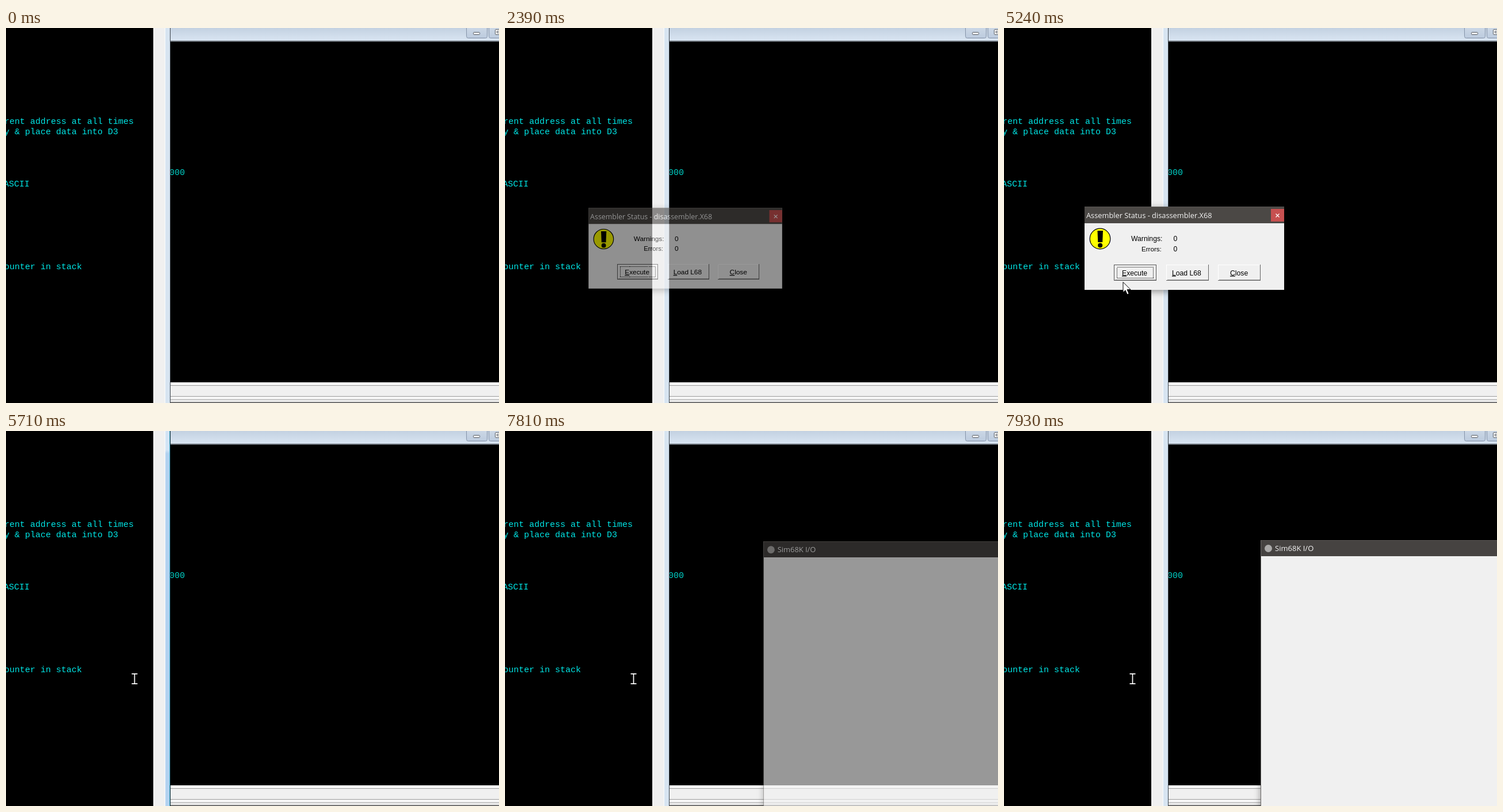
Recreate the animation shown at these times as an HTML page. Size 857x653 px, loop 7990 ms.

```html
<!DOCTYPE html>
<html lang="en">
<head>
<meta charset="utf-8">
<title>Assembler session</title>
<style>
  html, body { margin: 0; height: 100%; overflow: hidden; background: #000; }
  svg { display: block; width: 100vw; height: 100vh; }
  text { white-space: pre; }
  .code { font: 15px "Liberation Mono", "Courier New", monospace; fill: #00e6e6; }
  .title { font: 12.8px "Open Sans", "Noto Sans", sans-serif; fill: #f4f4f4; }
  .label { font: 12.2px "Liberation Sans", Arial, sans-serif; fill: #000; }
  .key { text-decoration: underline; }
  .shadow { filter: drop-shadow(0 3px 6px rgba(0, 0, 0, .4)); }
  .crisp { shape-rendering: crispEdges; }
</style>
</head>
<body>
<svg viewBox="0 0 857 653" preserveAspectRatio="none">
  <defs>
    <linearGradient id="bar" x2="0" y2="1">
      <stop stop-color="#c3d1e1"/><stop offset="1" stop-color="#d9e5f2"/>
    </linearGradient>
    <linearGradient id="glow" x2="0" y2="1">
      <stop stop-color="#d3e3f4"/><stop offset=".05" stop-color="#d3e5f6"/>
      <stop offset=".06" stop-color="#b3d2f0"/><stop offset="1" stop-color="#b3d2f0"/>
    </linearGradient>
    <linearGradient id="cap" x2="0" y2="1">
      <stop stop-color="#d0dbe8"/><stop offset="1" stop-color="#bccbde"/>
    </linearGradient>
    <clipPath id="pane"><path d="M286 24H857V617H286z"/></clipPath>
  </defs>

  <!-- left editor -->
  <g class="code">
    <text x="-3" y="167">rent address at all times</text>
    <text x="-3" y="185">y &amp; place data into D3</text>
    <text x="-4" y="276">ASCII</text>
    <text x="-3" y="420">ounter in stack</text>
  </g>

  <!-- right editor -->
  <g class="crisp">
    <path fill="#f0f0f0" d="M256 0h20v653h-20z"/>
    <path fill="#fafcfe" d="M276 0h1v653h-1z"/>
    <path fill="#d7e4f1" d="M277 0h8v653h-8z"/>
    <path fill="url(#bar)" d="M285 0h572v22H285z"/>
    <path fill="#6d747c" d="M285 22h572v2H285z"/>
    <path fill="#f0f0f0" d="M286 617h571v36H286z"/>
    <path fill="#fafafa" d="M286 617h571v5H286zM286 642h571v2H286zM286 648h571v2H286z"/>
    <path fill="#9a9a9a" d="M286 622h571v1H286zM286 641h571v1H286zM286 647h571v1H286z"/>
    <path fill="#747474" d="M286 651h571v2H286z"/>
    <path fill="#3c444c" d="M285 0h1v653h-1z"/>
    <g id="active">
      <path fill="url(#glow)" d="M277 0h8v653h-8z"/>
      <path fill="#5fc6e6" d="M284 0h1v653h-1z"/>
      <path fill="#10242c" d="M285 0h1v653h-1z"/>
    </g>
  </g>
  <g fill="url(#cap)" stroke="#8593a8">
    <rect x="800.5" y="-6" width="36" height="23.5" rx="3"/>
    <rect x="839.5" y="-6" width="36" height="23.5" rx="3"/>
  </g>
  <g fill="#fff" stroke="#50565e">
    <rect x="812.5" y="7.5" width="11" height="4" rx="1"/>
    <rect x="850.5" y="2.5" width="12" height="9" rx="1"/>
    <rect x="853.5" y="5.5" width="6" height="3"/>
  </g>
  <g clip-path="url(#pane)"><text class="code" style="fill:#00d2c8" x="284" y="256">000</text></g>

  <!-- assembler status -->
  <g id="dialog">
    <path class="shadow" fill="#f0f0f0" d="M140 311h347v145H140z"/>
    <path fill="#4b4845" d="M140 311h347v29H140z"/>
    <path fill="#5c5956" d="M140 311h347v1H140z"/>
    <text class="title" x="143" y="331">Assembler Status - disassembler.X68</text>
    <path fill="#c75050" d="M464 315h23v22h-23z"/>
    <path stroke="#fff" stroke-width="1.2" d="M472.5 323.5l6 6m0-6l-6 6"/>
    <circle cx="167" cy="367" r="17.8" fill="#ff0" stroke="#000" stroke-width="1.2"/>
    <path d="M162.5 353h9.5l-.8 20h-7.9z"/>
    <circle cx="167.2" cy="378.5" r="4"/>
    <g class="label">
      <text x="221" y="370.500">Warnings:</text><text x="294.500" y="370.500">0</text>
      <text x="239" y="388.500" style="font-size:11.6px">Errors:</text><text x="294.500" y="388.500">0</text>
    </g>
    <g id="buttons"></g>
    <g fill="none" class="crisp">
      <rect x="191.500" y="412.500" width="73" height="27" stroke="#555"/>
      <rect x="196.500" y="416.500" width="63" height="19" stroke="#000" stroke-dasharray="1 1"/>
    </g>
  </g>

  <!-- simulator output -->
  <g id="output">
    <path class="shadow" fill="#f0f0f0" d="M446 190h660v520H446z"/>
    <path fill="#464341" d="M446 190h660v28H446z"/>
    <path fill="#5b5855" d="M446 190h660v1H446z"/>
    <path fill="#6c6a68" d="M446 190h1v520h-1z"/>
    <circle cx="459.500" cy="204.500" r="6.500" fill="#aaa9a8"/>
    <text class="title" style="font-size:13px" x="471" y="209">Sim68K I/O</text>
  </g>

  <path id="arrow" fill="#fff" stroke="#000" d="M.5 .5V18.500L4.500 14.700L7.600 22L10.600 20.700L7.600 13.500H13.500z"/>
  <path id="beam" fill="none" stroke="#fff" stroke-width="1.700" d="M-5-8.700H5M0-8.700V8.700M-5 8.700H5"/>
</svg>
<script>
const LOOP = 7990;
const el = id => document.getElementById(id);

// Raised buttons: left edge, label start, underlined key, rest of the label
el('buttons').innerHTML = [
  [191, 205, 'E', 'xecute'], [282, 292, 'L', 'oad L68'], [372, 393, 'C', 'lose']
].map(([x, tx, key, rest]) => `
  <g class="crisp" fill="none">
    <path stroke="#fff" d="M${x + .5} 439V412.5h73"/>
    <path stroke="#a0a0a0" d="M${x + 2} 438.5h71.500V413"/>
    <path stroke="#646464" d="M${x} 439.5h73.500V412"/>
  </g>
  <text class="label" x="${tx}" y="430.500"><tspan class="key">${key}</tspan>${rest}</text>`).join('');

// Start, end, steps, x, y reached, pointer shape (kept until replaced)
const moves = [
  [540, 540, 1, 640.5, 613.5, 'beam'], [590, 690, 3, 414.5, 418],
  [910, 1050, 4, 68.5, 129.5], [1230, 1230, 1, 68, 129, 'none'],
  [2840, 2840, 1, 59, 51, 'arrow'], [2890, 2890, 1, 46, 49],
  [3060, 3280, 5, 74, 154], [3480, 3620, 4, 135, 236], [3770, 3930, 4, 188, 345],
  [4160, 4540, 7, 212, 392], [4600, 4940, 7, 208, 426], [4990, 4990, 1, 207, 441],
  [5240, 5240, 1, 206.5, 442], [5290, 5500, 5, 223, 431],
  [5660, 5660, 1, 223.5, 431.5, 'beam']
];

// Time, opacity, scale
const dialogFade = [[2390, .6, .97], [2440, 1, 1], [5610, .7, .97], [5660, .3, .93], [5710, 0, .9]];
const outputFade = [[7740, .25, .965], [7810, .637, .991], [7870, .9, .997], [7930, 1, 1]];

function pointer(t) {
  let x = 0, y = 0, shape = 'none';
  for (const [start, end, steps, toX, toY, next] of moves) {
    if (t < start) break;
    if (next) shape = next;
    const gap = (end - start) / (steps - 1) || 1;
    const p = Math.min(1, (Math.floor((t - start) / gap) + 1) / steps);
    const eased = 1 - (1 - p) ** 1.6;
    x += (toX - x) * eased;
    y += (toY - y) * eased;
  }
  return { x, y, shape };
}

function fade(id, stages, t, cx, cy) {
  const [, opacity, scale] = stages.filter(s => s[0] <= t).pop() || [0, 0, 1];
  el(id).setAttribute('display', opacity ? 'inline' : 'none');
  el(id).setAttribute('opacity', opacity);
  el(id).setAttribute('transform',
    `translate(${cx * (1 - scale)} ${cy * (1 - scale)}) scale(${scale})`);
}

function draw() {
  const t = performance.now() % LOOP;
  const isActive = t >= 2140 && t < 2390 || t >= 5610 && t < 7740;
  el('active').setAttribute('display', isActive ? 'inline' : 'none');
  fade('dialog', dialogFade, t, 313.5, 383.5);
  fade('output', outputFade, t, 776, 450);
  const { x, y, shape } = pointer(t);
  for (const id of ['arrow', 'beam']) {
    el(id).setAttribute('display', id === shape ? 'inline' : 'none');
    el(id).setAttribute('transform', `translate(${x} ${y})`);
  }
  requestAnimationFrame(draw);
}
draw();
</script>
</body>
</html>
```
